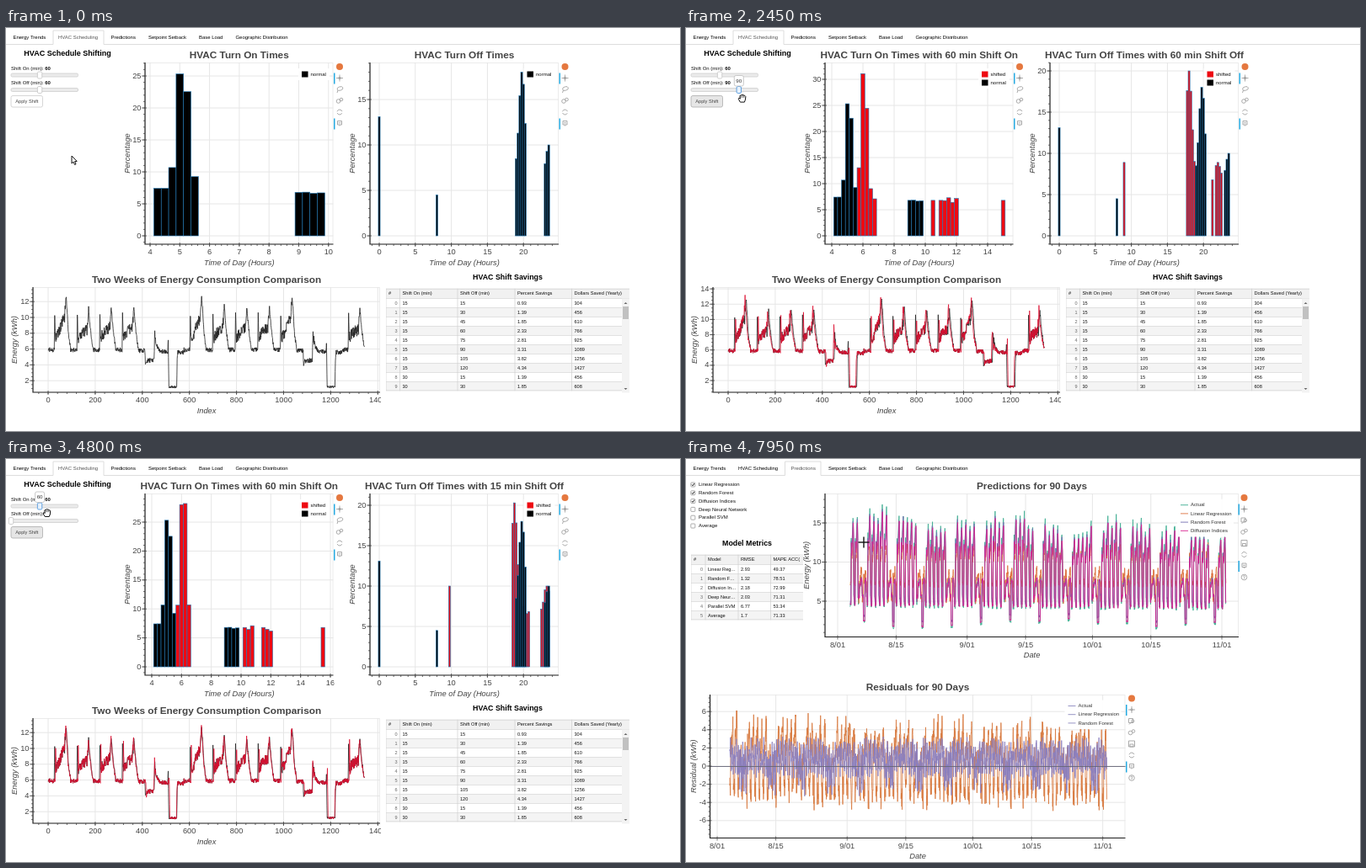
An HTML page with a canvas that plays this animation: 800 by 479 pixels, repeating every 8000 ms.

```html
<!DOCTYPE html>
<html lang="en">
<head>
<meta charset="utf-8">
<title>Energy dashboard</title>
<style>
html, body { margin: 0; width: 100%; height: 100%; overflow: hidden; background: #fff; }
canvas { display: block; }
</style>
</head>
<body>
<canvas id="stage" width="800" height="479"></canvas>
<script>
(() => {
const c = document.getElementById('stage').getContext('2d');
const LOOP = 8000, SANS = '"Liberation Sans", Arial, sans-serif';
const DARK = '#444', GRID = '#e6e6e6', BLUE = '#1f77b4', RED = '#ee0a12';

// ---------- helpers ----------
const noise = n => { const s = Math.sin(n * 12.9898 + 4.1) * 43758.5453; return (s - Math.floor(s)) * 2 - 1; };
const clamp = (v, a, b) => Math.max(a, Math.min(b, v));
const steps = (a, b, s) => {
  const out = [];
  for (let v = Math.ceil(a / s); v * s <= b; v++) out.push(v * s);
  return out;
};

function text(s, x, y, size = 6, { style = '', align = 'left', color = '#111' } = {}) {
  c.font = `${style} ${size}px ${SANS}`;
  c.textAlign = align;
  c.textBaseline = 'middle';
  c.fillStyle = color;
  c.fillText(s, x, y);
}
function rect(x, y, w, h, fill, stroke) {
  c.fillStyle = fill;
  c.fillRect(x, y, w, h);
  if (stroke) { c.strokeStyle = stroke; c.lineWidth = 1; c.strokeRect(x + .5, y + .5, w - 1, h - 1); }
}
function round(x, y, w, h, r, fill, stroke) {
  c.beginPath();
  c.roundRect(x, y, w, h, r);
  c.fillStyle = fill; c.fill();
  c.strokeStyle = stroke; c.lineWidth = .8; c.stroke();
}
function line(points, color, width = 1) {
  c.beginPath();
  points.forEach(([x, y]) => c.lineTo(x, y));
  c.strokeStyle = color; c.lineWidth = width; c.stroke();
}
function clipped(x, y, w, h, draw) {
  c.save(); c.beginPath(); c.rect(x, y, w, h); c.clip(); draw(); c.restore();
}
// Linear interpolation through [position, value] points
function curveAt(points, x) {
  const i = points.findIndex(p => p[0] > x);
  if (i === 0) return points[0][1];
  if (i < 0) return points[points.length - 1][1];
  const [[x0, y0], [x1, y1]] = [points[i - 1], points[i]];
  return y0 + (y1 - y0) * (x - x0) / (x1 - x0);
}

// ---------- pointer: [start, duration, x, y] ----------
const moves = [[50, 350, 26, 85], [1400, 280, 42, 82], [1800, 300, 54, 82], [2250, 500, 86, 86], [3250, 600, 18, 86],
  [4050, 200, 8, 84], [4400, 250, 42, 64], [4700, 600, 82, 64], [5650, 300, 138, 12], [6100, 400, 8, 50],
  [6950, 650, 70, 60], [7600, 350, 211, 99]];
function pointer(t) {
  let x = 78, y = 152;
  for (const [start, time, tx, ty] of moves) {
    const u = clamp((t - start) / time, 0, 1);
    x += (tx - x) * u;
    y += (ty - y) * u;
  }
  return [x, y];
}
// Shift in minutes chosen by dragging between two times
function dragged(t, from, to) {
  const [x] = pointer(clamp(t, from, to));
  return clamp(Math.round((x - 10) / 79.5 * 7 + 1) * 15, 15, 120);
}

// ---------- plots ----------
// p: frame l,r,t,b; xo,kx and yo,ky map data to pixels; xs,ys are tick steps
function plot(p, draw) {
  const X = v => p.xo + v * p.kx, Y = v => p.yo - v * p.ky;
  const xTicks = s => steps((p.l - p.xo) / p.kx, (p.r - p.xo) / p.kx, s);
  const yTicks = s => steps((p.yo - p.b) / p.ky, (p.yo - p.t) / p.ky, s);
  const xt = p.xt || xTicks(p.xs), yt = yTicks(p.ys);
  const tick = (x, y, dx, dy) => line([[x, y], [x + dx, y + dy]], DARK, .8);

  rect(p.l, p.t, p.r - p.l, p.b - p.t, '#fff', '#ebebeb');
  xt.forEach(v => line([[X(v), p.t], [X(v), p.b]], GRID));
  yt.forEach(v => line([[p.l, Y(v)], [p.r, Y(v)]], GRID));
  clipped(p.l, p.t, p.r - p.l, p.b - p.t, () => draw(X, Y));
  line([[p.l, p.t], [p.l, p.b], [p.r, p.b]], '#222', 1.2);

  xt.forEach(v => tick(X(v), p.b - 2, 0, 5));
  yt.forEach(v => tick(p.l - 4, Y(v), 6, 0));
  yTicks(p.ys / (p.ys === 2 ? 4 : 5)).forEach(v => tick(p.l - 2, Y(v), 2, 0));
  if (p.xs) xTicks(p.xs / (p.xs === 2 ? 4 : 5)).forEach(v => tick(X(v), p.b, 0, 2));

  const mid = { align: 'center', color: DARK }, italic = { ...mid, style: 'italic' }, cx = (p.l + p.r) / 2;
  clipped(0, 0, p.r + 1, 479, () =>
    xt.forEach((v, i) => text(p.names ? p.names[i] : v, X(v), p.b + 9.5, 9.3, mid)));
  yt.forEach(v => text(v, p.l - 4.5, Y(v), 9.3, { align: 'right', color: DARK }));
  text(p.title, cx, p.t - 8.5, 11.8, { ...mid, style: 'bold' });
  text(p.xLabel, cx, p.b + 22, 9.3, italic);
  c.save();
  c.translate(p.yLabelX, (p.t + p.b) / 2);
  c.rotate(-Math.PI / 2);
  text(p.yLabel, 0, 0, 9.3, italic);
  c.restore();
}

const icons = {
  pan: () => { c.moveTo(-4, 0); c.lineTo(4, 0); c.moveTo(0, -4); c.lineTo(0, 4); c.rect(-1, -1, 2, 2); },
  lasso: () => { c.ellipse(.5, -1, 3.5, 2.2, -.3, 0, 7); c.moveTo(-2, 1); c.lineTo(-3, 4); },
  zoom: () => { c.rect(-3.5, -3, 5, 5); c.moveTo(3, 0); c.arc(1.3, 0, 1.7, 0, 7); c.moveTo(0, 1); c.lineTo(-3, 4); },
  wheel: () => { c.arc(-1.5, .5, 2.3, 0, 7); c.moveTo(3.8, -1.5); c.arc(2, -1.5, 1.8, 0, 7); },
  save: () => { c.rect(-3.5, -3.5, 7, 7); c.rect(-2, .5, 4, 3); },
  reset: () => { c.arc(0, 0, 3, .4, 2.8); c.moveTo(-3, -.7); c.arc(0, 0, 3, 3.5, 6); },
  hover: () => { c.rect(-2.5, -3, 5, 4.5); c.moveTo(-1.5, -.7); c.lineTo(1.5, -.7); c.moveTo(0, 1.5); c.lineTo(0, 3); },
  help: () => { c.arc(0, 0, 3.3, 0, 7); c.moveTo(-1, -1); c.arc(0, -1, 1, 3, 7.5); c.lineTo(0, 1.8); }
};
function toolbar(x, y, names) {
  c.fillStyle = '#e5783f';
  c.beginPath(); c.arc(x, y, 4, 0, 7); c.fill();
  names.split(' ').forEach((name, i) => {
    const cy = y + 13.5 * (i + 1);
    if (name === 'pan' || name === 'hover') rect(x - 7, cy - 6, 1.5, 13, '#26aae1');
    c.save();
    c.translate(x, cy);
    c.strokeStyle = '#a2a2a2'; c.lineWidth = .9;
    c.beginPath(); icons[name](); c.stroke();
    c.restore();
  });
}

// ---------- start and stop histograms ----------
// Bar groups: [start hour, bars, peak, peak bar]; groups without a peak stay near 6.8 percent
const normalOn = [[4.125, 6, 28, 3.4], [8.875, 4]];
const normalOff = [[-.125, 1, 13.1, 0], [7.875, 1, 4.5, 0], [18.875, 6, 18.1, 3.2], [22.875, 3, 10, 2]];
const onViews = [
  { xo: 29.8, kx: 35.3, xs: 1, ky: 7.6, bars: [] },
  { min: 60, xo: 99, kx: 18.5, xs: 2, ky: 6.2, bars: [[5.625, 5, 33, 1.3], [10.375, 1], [10.875, 5], [14.875, 1]] },
  { min: 60, xo: 131.6, kx: 10.47, xs: 5, ky: 5.66, bars: [[5.625, 5, 34.6, 1.05], [10.625, 5, 10, 2], [23.375, 1]] },
  { min: 60, xo: 102.3, kx: 17.67, xs: 2, ky: 6.88, bars: [[5.625, 4, 33, 1.5], [10.125, 3], [11.375, 3], [15.375, 1]] },
  { min: 105, xo: 104, kx: 17.25, xs: 2, ky: 5.83, bars: [[5.625, 7, 33.4, 4], [11.16, 5, 11.6, 1], [15.7, 1]] }
];
const offViews = [
  { ky: 10.8, bars: [] },
  { min: 60, ky: 9.8, bars: [[8.875, 1, 8.9, 0], [17.625, 5, 20, 1], [21.125, 1], [21.625, 4, 8.9, 1]] },
  { min: 120, ky: 10.8, bars: [[16.875, 6, 17.4, 0], [20.625, 4, 12.7, 3]] },
  { min: 30, ky: 10.8, bars: [[1.375, 1], [8.875, 1, 9.2, 0], [18.125, 10, 17.7, 3], [22.125, 4, 9, 1]] },
  { min: 15, ky: 9.6, bars: [[9.625, 1, 10, 0], [18.375, 10, 20.3, 1], [22.375, 5, 10, 3]] }
];
// [time, on view, off view]
const views = [[0, 0, 0], [1400, 1, 1], [2700, 2, 2], [3850, 3, 3], [4350, 3, 4], [5250, 4, 4]];

function bars(groups, width, X, Y, fill) {
  for (const [start, count, peak = 6.8, at = 0] of groups) for (let i = 0; i < count; i++) {
    const bell = Math.exp(-((i - at) ** 2) / width), wobble = noise(start + i) * .8 * (1 - bell);
    const x = X(start + i / 4), w = X(start + i / 4 + .25) - x, y = Y(6.8 + (peak - 6.8) * bell + wobble);
    c.fillStyle = fill;
    c.fillRect(x, y, w, Y(0) - y);
    c.strokeStyle = BLUE; c.lineWidth = .6;
    c.strokeRect(x, y, w, Y(0) - y);
  }
}
function histogram(kind, view, normal, width, box) {
  const shift = view.min ? ` with ${view.min} min Shift ${kind}` : '';
  plot({ t: 41, b: 257, yo: 247, ys: 5, ...box, ...view,
    title: `HVAC Turn ${kind} Times${shift}`, xLabel: 'Time of Day (Hours)', yLabel: 'Percentage' },
  (X, Y) => { bars(view.bars, width, X, Y, RED); bars(normal, width, X, Y, '#000'); });
  const x = box.r - 37.5, keys = [['shifted', RED], ['normal', '#000']].slice(view.min ? 0 : 1);
  rect(x - 4, 48, 37, 4 + keys.length * 10, 'rgba(255,255,255,.95)');
  keys.forEach(([name, color], i) => {
    rect(x, 51.5 + i * 10, 7.5, 7, color);
    text(name, x + 10.5, 55 + i * 10);
  });
  toolbar(box.r + 7.5, 46, 'pan lasso wheel reset hover');
}

// ---------- two weeks of consumption, in quarter hours ----------
function dayShape(d) {
  const tall = d === 0 || d === 6 || d === 10, p = tall ? 12.7 : 11.2 + noise(d) * .3;
  if (d % 7 === 4) return [[0, 5.8], [27, 5.8], [29, 4], [32, 4.5], [66, 4.6], [69, 8.6], [72, 7], [80, 6.2], [95, 5.7]];
  if (d % 7 === 5) return [[0, 5.7], [28, 5.7], [30, 6.9], [33, 1.2], [66, 1.2], [68, 4.6], [71, 5.6]];
  return [[0, 5.9], [26, 5.9], [28, 10.4], [31, 7.4], [44, 8], [70, p - 2.6], [76, p], [80, p - 1.6], [86, 8], [95, 6]];
}
// Mornings start later by `on` minutes, evenings end earlier by `off`
function consumption(on, off) {
  const out = [];
  for (let d = 0; d < 14; d++) {
    const shape = dayShape(d).map(([q, v]) => [q + (q > 25 && q < 40 ? on / 15 : q > 62 && q < 93 ? -off / 15 : 0), v]);
    for (let q = 0; q < 96; q++) {
      const v = curveAt(shape, q), i = d * 96 + q;
      const amp = v < 2 ? .15 : q > 31 && q < 74 && v > 6.5 ? .75 : .3;
      out.push([i, v + noise(i) * amp]);
    }
  }
  return out;
}

const dollars = [304, 456, 610, 766, 925, 1089, 1256, 1427, 456, 608];
const savings = dollars.map((v, i) => [i < 8 ? 15 : 30, i % 8 * 15 + 15, (v / 329.2 + .0016).toFixed(2), v]);
const metrics = [['Linear Reg…', 2.93, 49.37], ['Random F…', 1.32, 78.51], ['Diffusion In…', 2.18, 72.99],
  ['Deep Neur…', 2.03, 71.31], ['Parallel SVM', 6.77, 53.34], ['Average', 1.7, 71.33]];

function table(cols, right, y0, head, rows) {
  const h = 11 * rows.length + 12, l = cols[0];
  clipped(l, y0, right - l, h, () => {
    rect(l, y0, right - l, 12, '#f1f1f1');
    head.forEach((s, i) => text(s, cols[i] + 3, y0 + 6, 5.7));
    rows.forEach((row, r) => {
      const y = y0 + 12 + r * 11;
      rect(l, y, right - l, 11, r % 2 ? '#f4f4f4' : '#fff');
      line([[l, y], [right, y]], '#d6d6d6', .7);
      text(r, cols[1] - 3, y + 6, 5.5, { align: 'right', color: '#666' });
      row.forEach((s, i) => text(s, cols[i + 1] + 3, y + 6, 5.6));
    });
    cols.forEach(x => line([[x, y0], [x, y0 + h]], '#cfcfcf', .7));
    line([[l, y0 + .5], [right, y0 + .5]], '#d0d0d0');
    line([[l, y0 + h - .5], [right, y0 + h - .5]], '#d0d0d0');
  });
}

function slider(name, y, value, dragging) {
  const x = 6 + (value - 15) / 105 * 79.5;
  text(`Shift ${name} (min):`, 6, y - 8);
  text(value, 46.2, y - 8, 6, { style: 'bold' });
  round(6, y - 2, 79.5, 4, 1.5, '#ebebeb', '#cfcfcf');
  round(x - 2.7, y - 4, 5.4, 8, 1.5, dragging ? '#e8f2fc' : '#fff', dragging ? '#3f8fdc' : '#c4c4c4');
  if (!dragging) return;
  const w = value > 99 ? 15 : 11;
  round(x - w / 2, y - 17, w, 12.5, 2, '#fff', '#bbb');
  text(value, x, y - 10.5, 6.2, { align: 'center', color: '#333' });
}

function scheduling(t) {
  const [, vOn, vOff] = views.filter(v => v[0] <= t).pop();
  const on = onViews[vOn], off = offViews[vOff], focus = t > 600;
  text('HVAC Schedule Shifting', 73, 31, 9, { style: 'bold', align: 'center', color: '#000' });
  round(6, 80.5, 37.5, 13.5, 2, focus ? '#e6e6e6' : '#fff', focus ? '#adadad' : '#ccc');
  text('Apply Shift', 24.8, 87.2, 5.7, { align: 'center', color: DARK });

  histogram('On', on, normalOn, 1.2, { l: 165, r: 388.5, yLabelX: 144 });
  histogram('Off', off, normalOff, 5, { l: 432, r: 656, xo: 443, kx: 8.56, xs: 5, yLabelX: 411 });

  const high = vOff === 1 || vOff === 3;
  plot({ l: 32, r: 444, t: 308, b: 433, xo: 50, kx: .2795, xs: 200, yo: high ? 437.2 : 438, ky: high ? 9.08 : 9.4, ys: 2,
    title: 'Two Weeks of Energy Consumption Comparison', xLabel: 'Index', yLabel: 'Energy (kWh)', yLabelX: 10 },
  (X, Y) => {
    const draw = (data, color) => line(data.map(([i, v]) => [X(i), Y(v)]), color, .8);
    draw(consumption(0, 0), '#222');
    if (on.min) draw(consumption(on.min, off.min), '#dc1032');
  });

  text('HVAC Shift Savings', 595.5, 297, 8.85, { style: 'bold', align: 'center', color: '#000' });
  table([451, 467.5, 536, 604, 671.5], 740, 309.5,
    ['#', 'Shift On (min)', 'Shift Off (min)', 'Percent Savings', 'Dollars Saved (Yearly)'], savings);
  rect(731, 321.5, 9, 112, '#f3f3f3');
  rect(732, 331, 7, 15, '#c1c1c1');
  for (const [y, s] of [[327, 1], [429, -1]]) {
    c.fillStyle = '#666';
    c.beginPath(); c.moveTo(733.5, y + s); c.lineTo(737.5, y + s); c.lineTo(735.5, y - s); c.fill();
  }
  slider('On', 56, dragged(t, 4700, 5300), t > 4680 && t < 5700);
  slider('Off', 73.5, dragged(t, 1680, 4300), t > 1680 && t < 4400);
}

// ---------- predictions ----------
const dayCurve = [[0, 0], [4, 0], [6, .75], [8, .62], [11, .72], [15, .95], [17, 1], [19, .8], [21, .1], [24, 0]];
const hours = Array.from({ length: 90 * 24 }, (_, i) => {
  const d = Math.floor(i / 24), h = i % 24;
  return { i, d, h, rest: d % 7 === 2 || d % 7 === 3, s: curveAt(dayCurve, h), day: i / 24 + 3 };
});
const crest = d => 16 - 1.7 * d / 90 + .6 * Math.sin(d / 4.7) + noise(d) * .9;
function load({ i, d, h, rest, s }, low, gain, wobble) {
  const n = noise(i + wobble * 99) * wobble;
  if (!rest) return low - .4 * d / 90 + (crest(d) - low) * gain * s + n;
  if (d % 7 === 3 && h > 3 && h < 13) return 1.7 + noise(d) * .7 + (low - 4.4) * 2 + n * .5;
  return 5.6 + 2.2 * s + n;
}
const series = (name, color, value) => ({ name, color, values: hours.map(value) });
const models = [
  series('Actual', '#3fae92', e => load(e, 4.5, 1, .35)),
  series('Linear Regression', '#dd7340', e => e.rest ? 5.3 + 3.6 * e.s + noise(e.i) * .7 : 7.2 + 5 * e.s + noise(e.i) * .5),
  series('Random Forest', '#7570b3', e => load(e, 4.9, .95, .3)),
  series('Diffusion Indices', '#d8208f', e => load({ ...e, s: curveAt(dayCurve, (e.h + 23) % 24) }, 4.6, .93, .25))
];
const residuals = [
  series('', '#d97b42', e => (e.rest ? -2.6 + 4 * e.s : -2.9 - .8 * noise(e.d + 5) + (7.6 - e.d / 90) * e.s) + noise(e.i + 7) * 1.4),
  series('', '#8c80bf', e => (e.rest ? -.2 : .9) + 1.1 * Math.sin(e.h / 24 * 12.6) + noise(e.i + 3) * (e.rest ? 2.1 : 1.3))
];
const dates = { xt: [0, 14, 31, 45, 61, 75, 92], names: ['8/01', '8/15', '9/01', '9/15', '10/01', '10/15', '11/01'], xLabel: 'Date' };

function legend(x, y, rows) {
  rect(x - 4, y - 7, 67, rows.length * 10.2 + 4, 'rgba(255,255,255,.95)');
  rows.forEach(({ name, color }, i) => {
    line([[x, y + i * 10.2], [x + 9, y + i * 10.2]], color, .9);
    text(name, x + 12, y + i * 10.2, 6, { color: '#333' });
  });
}

function predictions(t) {
  const shown = models.slice(0, t >= 7400 ? 4 : 3), count = t >= 6900 ? 3 : 2;
  [...models.slice(1).map(m => m.name), 'Deep Neural Network', 'Parallel SVM', 'Average'].forEach((s, i) => {
    const y = 30.5 + i * 9.8;
    round(5.8, y - 2.5, 5, 5, .8, '#fff', '#999');
    if (i < count) line([[6.8, y], [8, y + 1.3], [9.9, y - 1.5]], '#222');
    text(s, 15, y);
  });
  text('Model Metrics', 72.5, 101, 8.85, { style: 'bold', align: 'center', color: '#000' });
  table([6, 23, 62, 100.5], 139, 113.5, ['#', 'Model', 'RMSE', 'MAPE ACC(%)'], metrics);
  rect(135, 114, 4, 11, '#f1f1f1');

  const curves = (list, X, Y) => list.forEach(({ color, values }) =>
    line(hours.map((e, i) => [X(e.day), Y(values[i])]), color, .85));
  plot({ ...dates, l: 165, r: 656, t: 41, b: 211.5, xo: 180, kx: 4.957, yo: 215.5, ky: 9.3, ys: 5,
    title: 'Predictions for 90 Days', yLabel: 'Energy (kWh)', yLabelX: 143 },
  (X, Y) => curves(shown, X, Y));
  legend(587, 54.7, shown);
  toolbar(662.5, 46, 'pan zoom wheel save reset hover help');

  plot({ ...dates, l: 28.5, r: 521.5, t: 280, b: 450.5, xo: 37, kx: 4.975, yo: 365, ky: 10.8, ys: 2,
    title: 'Residuals for 90 Days', yLabel: 'Residual (kWh)', yLabelX: 9 },
  (X, Y) => {
    curves(residuals, X, Y);
    line([[28, 365.5], [522, 365.5]], '#667', .9);
  });
  legend(453.5, 293.5, models.slice(0, 3).map(m => ({ name: m.name, color: '#8c88bf' })));
  toolbar(529, 284.5, 'pan zoom wheel save reset hover help');
}

// ---------- tabs and cursor ----------
const tabs = [['Energy Trends', 8.5], ['HVAC Scheduling', 62, 56, 116], ['Predictions', 124.5, 117.5, 160],
  ['Setpoint Setback', 169], ['Base Load', 229], ['Geographic Distribution', 272.5]];
function tabBar(active) {
  const [, , a, b] = tabs[active];
  line([[0, 19.5], [a, 19.5], [a, 3], [b, 3], [b, 19.5], [800, 19.5]], '#ddd');
  tabs.forEach(([name, x], i) => text(name, x, 11, 5.95, { color: i === active ? '#555' : '#000' }));
}

const arrow = new Path2D('M0 0V9L2 7.2 3.6 10.5 5 9.8 3.6 6.6 6.2 6.4Z');
const hand = new Path2D('M-2.5 4.5L-4.5 1-4-.5-2.5 .5-3-3-1.5-3.8 0-4.2 1.5-3.8 3-3.2 4-2 3.6 1.5 2.5 4.5Z');
function cursor(t) {
  const [x, y] = pointer(t);
  c.save();
  c.translate(x, y);
  if (t > 7000 && x > 165) {
    line([[-6.5, 0], [6.5, 0]], '#111', 1.4);
    line([[0, -6.5], [0, 6.5]], '#111', 1.4);
  } else {
    const grab = t > 350 && t < 5700, shape = grab ? hand : arrow;
    c.fillStyle = '#fff'; c.fill(shape);
    c.strokeStyle = '#111'; c.lineWidth = 1; c.lineJoin = 'round'; c.stroke(shape);
    if (grab) for (const k of [-1.2, .5, 2.1]) line([[k, -3.5], [k, -.8]], '#111', .6);
  }
  c.restore();
}

function render(now) {
  const t = now % LOOP, tab = t < 6050 ? 1 : 2;
  rect(0, 0, 800, 479, '#fff');
  tabBar(tab);
  (tab === 1 ? scheduling : predictions)(t);
  cursor(t);
  requestAnimationFrame(render);
}
requestAnimationFrame(render);
})();
</script>
</body>
</html>
```
